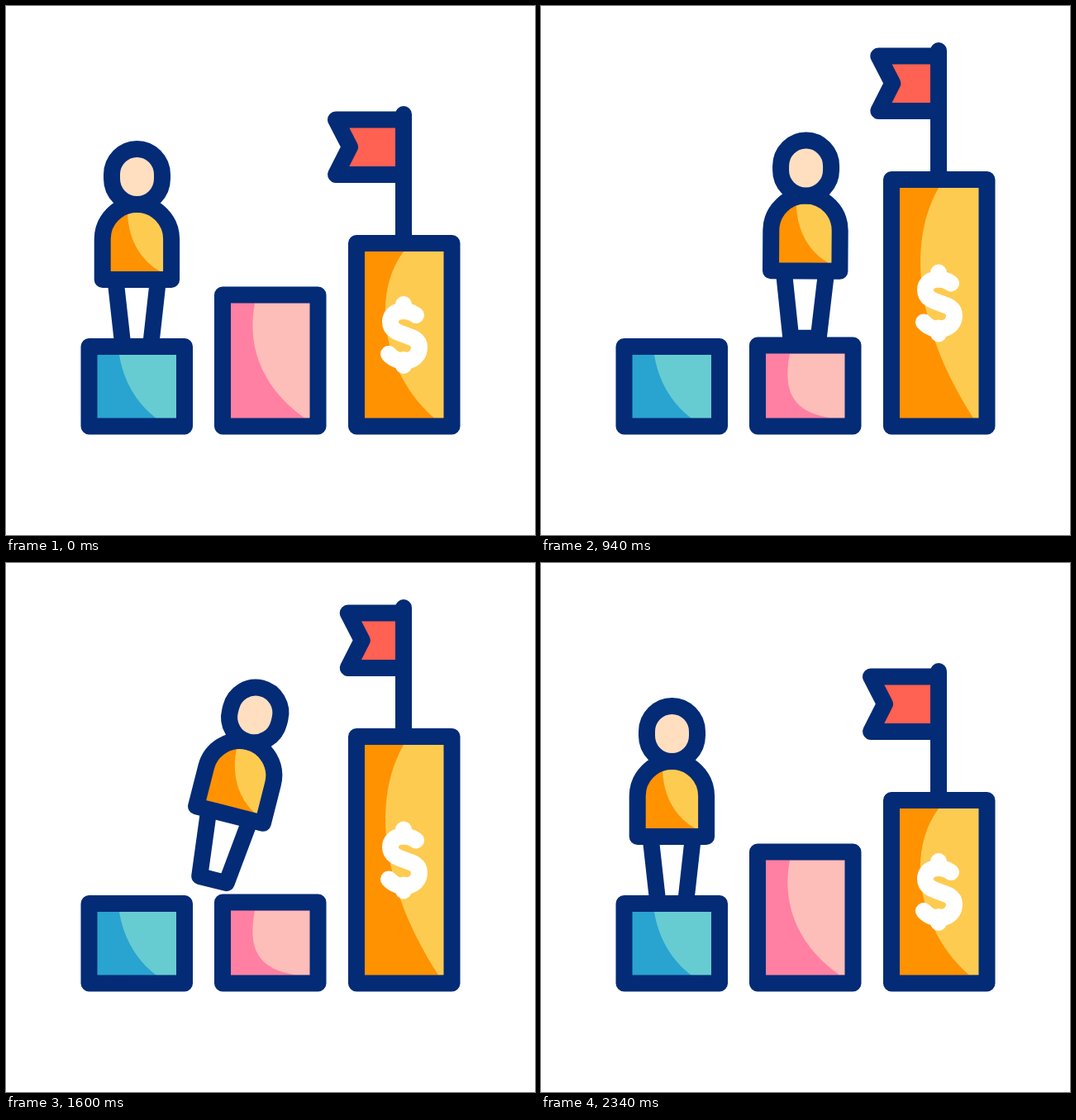
An HTML page for the animation above (2400 ms loop, 640 px wide and 640 px high).

```html
<!DOCTYPE html>
<html lang="en">
<head>
<meta charset="utf-8">
<title>Steps to success</title>
<style>
  html, body { margin: 0; width: 100%; height: 100%; overflow: hidden; background: #fff; }
  svg { display: block; width: 100%; height: 100%; }
  .line { stroke: #032b76; stroke-width: 20; stroke-linecap: round; stroke-linejoin: round; }
  .open { fill: none; }
</style>
</head>
<body>
<svg viewBox="0 0 640 640">
  <g id="person">
    <path class="line" fill="#fff" d="M132.5 331L141.5 412H175L184 331"/>
    <path fill="#ff9200" d="M116.7 331V282a41.7 42 0 0 1 83.4 0V331Z"/>
    <path fill="#fecb51" d="M147 250C148 282 162 308 188 322H194V270L175 246H147Z"/>
    <path class="line open" d="M116.7 331V282a41.7 42 0 0 1 83.4 0V331Z"/>
    <path class="line" fill="#ffdfc0" d="M128 204a30.5 31 0 0 1 61 0V209a30.5 31 0 0 1-61 0Z"/>
  </g>

  <path id="cloth" class="line" fill="#ff6152"/>
  <path id="pole" class="line" d="M481 131V287"/>

  <rect x="100.5" y="412" width="115.5" height="96.5" fill="#29a3d0"/>
  <path fill="#66ccd2" d="M137 422C142 453 157 480 182 499H210V420H137Z"/>
  <rect class="line open" x="100.5" y="412" width="115.5" height="96.5"/>

  <rect id="midFill" x="262" width="115.5" fill="#ff80a2"/>
  <path id="midShine" fill="#fdbdb9"/>
  <rect id="midLine" class="line open" x="262" width="115.5"/>

  <rect id="tallFill" x="424" width="115.5" fill="#ff9200"/>
  <path id="tallShine" fill="#fecb51"/>
  <rect id="tallLine" class="line open" x="424" width="115.5"/>

  <g id="dollar" fill="none" stroke="#fff" stroke-width="20" stroke-linecap="round" stroke-linejoin="round">
    <path d="M496 374C486 366 465 367 465 382C465 402 500 394 500 413C500 431 475 435 463 421"/>
    <path d="M481 361V369M481 428V435"/>
  </g>
</svg>
<script>
  const LOOP = 2400, FLOOR = 508.5, STEP = 161, RISE = 77;
  const el = id => document.getElementById(id);

  // Progress from 0 to 1, plain and eased.
  const span = (t, start, time) => Math.min(1, Math.max(0, (t - start) / time));
  const smooth = k => k * k * (3 - 2 * k);
  const ease = (t, start, time) => smooth(span(t, start, time));

  // Up quickly, later back down over the given time.
  const stretch = (t, fall) => ease(t, 200, 200) - ease(t, 1640, fall);

  function wave(t) {
    const fade = ease(t, 400, 200) - ease(t, 1940, 400);
    return fade * (5 + 16 * Math.cos(2 * Math.PI * (t - 730) / 1020));
  }

  // One jump: rises on a slant, drops steeply, leans back and then forward.
  function hop(t, dir, start, air, swing, height, lean) {
    const s = span(t, start, air), p = span(t, start, swing);
    return {
      x: dir * STEP * smooth(s),
      y: -height * s ** 2.5 * (1 - s),
      turn: -dir * lean * Math.sin(2 * Math.PI * p ** 1.81)
    };
  }

  function drawPerson(t) {
    const out = hop(t, 1, 400, 555, 790, 440, 14.8);
    const back = hop(t, -1, 1228, 808, 1102, 376, 18.4);
    el("person").setAttribute("transform",
      `translate(${out.x + back.x} ${out.y + back.y}) rotate(${out.turn + back.turn} 158 422)`);
  }

  // The curve is "x x" control points with their distance from top and bottom.
  function drawBar(name, top, right, x0, ax, down, bx, up, x3) {
    for (const part of ["Fill", "Line"]) {
      const rect = el(name + part);
      rect.setAttribute("y", top);
      rect.setAttribute("height", FLOOR - top);
    }
    const inner = top + 10, base = FLOOR - 10;
    el(name + "Shine").setAttribute("d",
      `M${x0} ${inner}C${ax} ${inner + down} ${bx} ${base - up} ${x3} ${base}H${right}V${inner}Z`);
  }

  const moveY = (id, y) => el(id).setAttribute("transform", `translate(0 ${y})`);

  function draw(t) {
    const k = stretch(t, 560), dx = wave(t);
    drawPerson(t);
    drawBar("mid", 349.5 + 61 * k, 372, 301, 292, 47, 305, 40 - 33 * k, 361 - 10 * k);
    drawBar("tall", 287 - RISE * k, 534, 481, 441, 53 + 17 * k, 456, 53 + 50 * k, 518 + 5 * k);
    moveY("dollar", -RISE / 2 * k);
    moveY("pole", -RISE * k);
    moveY("cloth", -RISE * stretch(t, 530));
    el("cloth").setAttribute("d",
      `M481 137.5H${399 + dx}L${416 + dx} 170.5L${399 + dx} 204H481`);
  }

  const start = performance.now();
  function tick() {
    draw((performance.now() - start) % LOOP);
    requestAnimationFrame(tick);
  }
  draw(0);
  requestAnimationFrame(tick);
</script>
</body>
</html>
```
